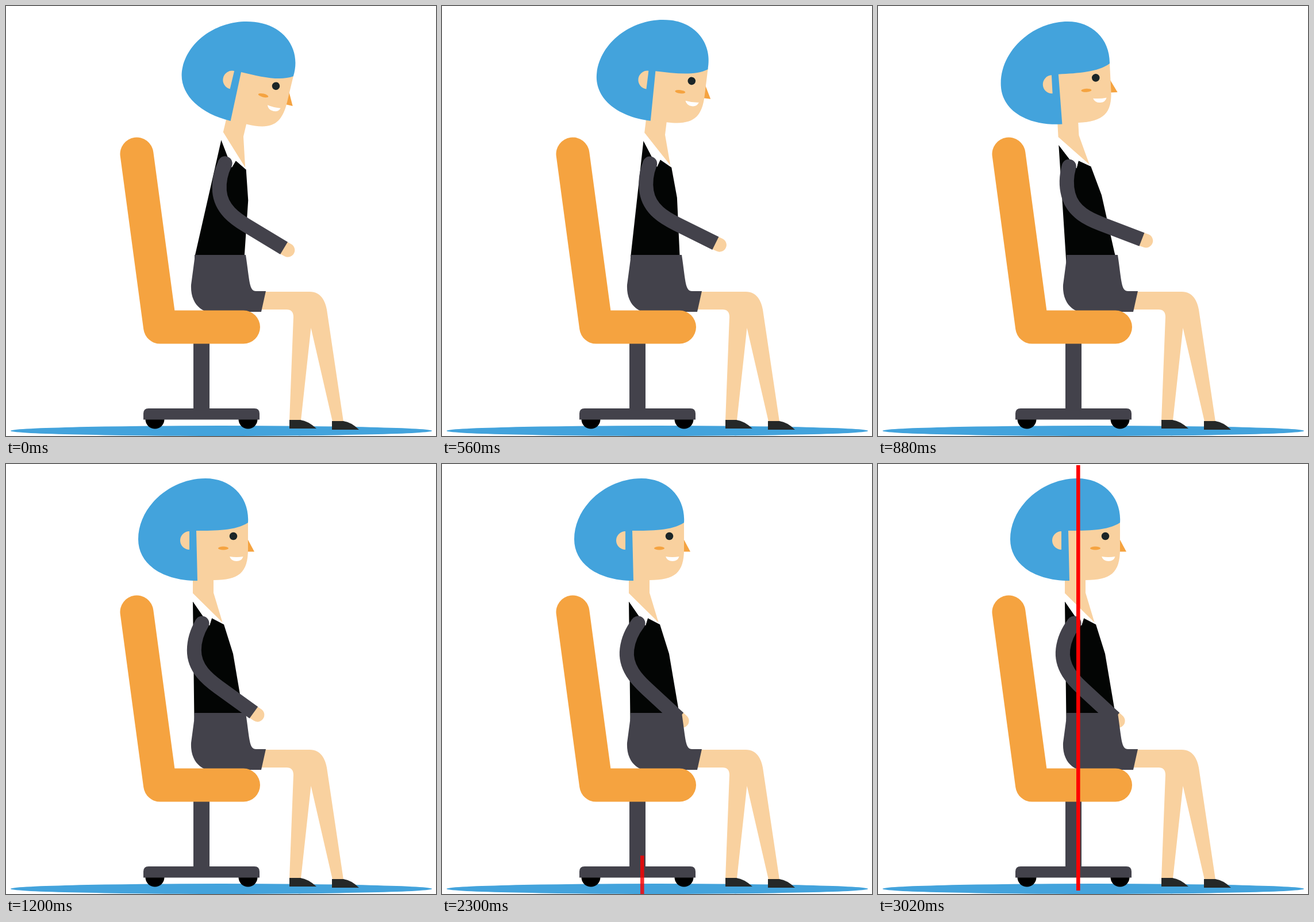
Write an HTML page that moves like this. It is 748 by 748 pixels and loops after 6 s.

```html
<!DOCTYPE html>
<html lang="en">
<head>
<meta charset="utf-8">
<title>Sitting upright</title>
<style>
  html, body { margin: 0; width: 100%; height: 100%; overflow: hidden; background: #fff; }
  svg { display: block; width: 100%; height: 100%; }
  .skin { fill: #f9d19f; }
  .hair { fill: #43a3dc; }
  .grey { fill: #43424b; }
  .orange { fill: #f5a340; }
  .white { fill: #fff; }
  .shoe { fill: #252828; }
  .black { fill: #030504; }
</style>
</head>
<body>
<svg viewBox="0 0 748 748">
  <ellipse class="hair" cx="374.5" cy="739" rx="366.5" ry="9"/>

  <path class="skin" d="M440 497H528Q552 497 558 528L587 723H568L530.5 560L513 721H493L500 541Q500 528 488 528H440Z"/>
  <path class="shoe" d="M493 735V720H512Q526 722 540 735Z"/>
  <path class="shoe" d="M567 737V722H587Q601 724 614 737Z"/>

  <g id="body">
    <path class="skin" d="M325 190V225L377 277L361 224V190Z"/>
    <path class="black" d="M325 239L327.5 446L416 450L412 430L395 330L379 279L358 268L354 281Z"/>
    <path class="white" d="M325 225L377 276L379 279L358 268L354 281L325 239Z"/>
    <path class="orange" d="M420 130L432 152.500H420Z"/>
    <path class="skin" d="M328 108L421 100V148C421 189 405 202 361 202H328Z"/>
    <path class="hair" d="M333 203C272 203 230 174 230 131C230 74 286 25 347 25C392 25 424 58 421 102C400 116 365 116 331 116Z"/>
    <path class="skin" d="M319 117A16 16 0 0 0 319 149Z"/>
    <circle cx="395.500" cy="125.500" r="6.800" fill="#1b2527"/>
    <ellipse class="orange" cx="378" cy="146.500" rx="9" ry="3"/>
    <path class="white" d="M389 161Q401 163 412.500 161Q410 169 401 169Q392 169 389 161Z"/>
    <g id="arm" fill="none">
      <path d="M429 430L438 436" stroke="#f9d19f" stroke-width="24" stroke-linecap="round"/>
      <circle class="grey" cx="341" cy="277" r="12.500"/>
      <path d="M341 277Q327.500 300 327.500 324C327.500 356 352 375 370 388L431.500 432" stroke="#43424b" stroke-width="25"/>
    </g>
  </g>

  <path class="grey" d="M328 433H417C424 480 423 496 435 496H452L444 532H349C330 525 321 508 322 485L328 440Z"/>

  <circle cx="259" cy="719" r="16.500"/>
  <circle cx="421" cy="719" r="16.500"/>
  <path class="grey" d="M326 580H354V700H432Q441 700 441 709V719.500H239V709Q239 700 248 700H326Z"/>
  <path d="M227.500 257.500L268 558.500H413" fill="none" stroke="#f5a340" stroke-width="58" stroke-linecap="round" stroke-linejoin="round"/>

  <rect id="line" x="345" width="6.600" fill="#fe0000"/>
</svg>
<script>
  const [body, arm, line] = ["body", "arm", "line"].map(id => document.getElementById(id));
  const LOOP = 6000;
  // Lean of the upper body: [ms, degrees]
  const lean = [[0, 13.5], [262, 16.3], [874, -3], [1180, 0]];

  const clamp = x => Math.min(1, Math.max(0, x));

  // Timing curve with handles (a, 0) and (b, 1)
  function ease(x, a, b) {
    x = clamp(x);
    let lo = 0, hi = 1;
    for (let i = 0; i < 30; i++) {
      const s = (lo + hi) / 2, r = 1 - s;
      if (3 * r * r * s * a + 3 * r * s * s * b + s ** 3 < x) lo = s; else hi = s;
    }
    return lo * lo * (3 - 2 * lo);
  }

  function swing(t) {
    for (let i = 1; i < lean.length; i++) {
      const [t0, v0] = lean[i - 1], [t1, v1] = lean[i];
      if (t < t1) return v0 + (v1 - v0) * (1 - Math.cos(Math.PI * (t - t0) / (t1 - t0))) / 2;
    }
    return 0;
  }

  function draw(t) {
    body.setAttribute("transform", `rotate(${swing(t)} 374.6 445)`);
    const raised = 25.1 * (1 - ease(t / 1840, 0.79, 0.42));
    arm.setAttribute("transform", `rotate(${7.1 - raised} 341 277)`);

    const p = ease((t - 2030) / 930, 0.77, 0.02);
    const top = 748 - 746 * p, bottom = 742 + 16 * (1 - p);
    line.setAttribute("y", top);
    line.setAttribute("height", bottom - top);
    line.setAttribute("opacity", clamp((t - 2030) / 330));
  }

  const start = performance.now();
  function tick() {
    draw((performance.now() - start) % LOOP);
    requestAnimationFrame(tick);
  }
  tick();
</script>
</body>
</html>
```
